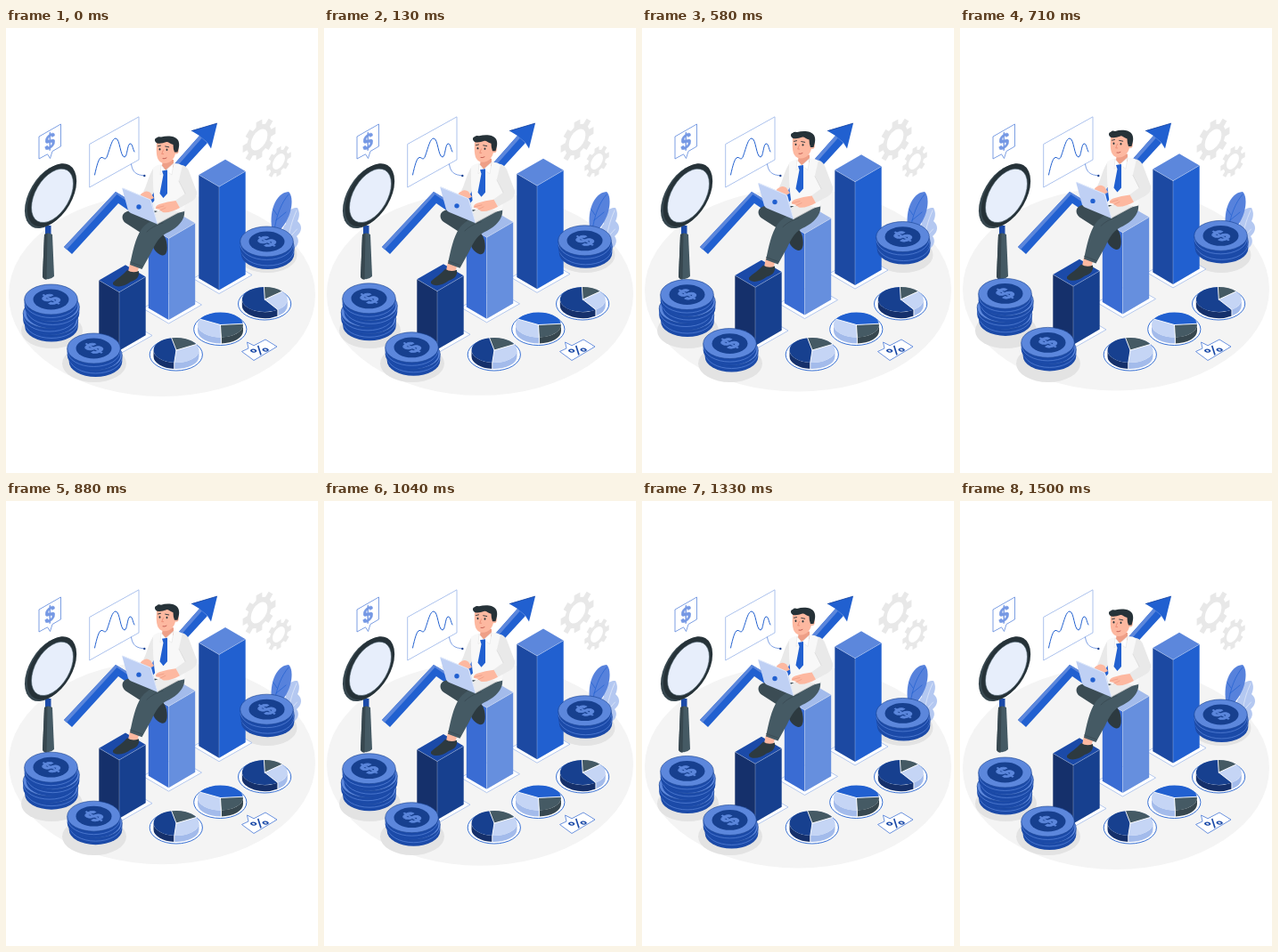
Write an HTML page that moves like this. It is 350x500 px and loops after 1540 ms.

```html
<!DOCTYPE html>
<html lang="en">
<head>
<meta charset="utf-8">
<title>Growth</title>
<style>
html, body { margin: 0; width: 100%; height: 100%; overflow: hidden; background: #fff; }
svg { display: block; width: 350px; height: 500px; }
text { font-family: Inter, Arial, sans-serif; font-weight: 700; text-anchor: middle; }
</style>
</head>
<body>
<svg id="stage" viewBox="0 0 350 500"></svg>
<script>
const blue = '#2160d0', mid = '#5c87dc', pale = '#a3bbeb', ice = '#c5d5f5',
  navy = '#17408f', deep = '#15306b', royal = '#1b4aa8',
  slate = '#455a64', dusk = '#37474f', ink = '#263238', skin = '#fdb8a0';

const path = (d, fill, extra = '') => `<path d="${d}" fill="${fill}" ${extra}/>`;
const line = (d, color, w = 1) =>
  path(d, 'none', `stroke="${color}" stroke-width="${w}" stroke-linecap="round" stroke-linejoin="round"`);
const poly = (pts, fill, extra = '') => `<polygon points="${pts}" fill="${fill}" ${extra}/>`;
const oval = (x, y, rx, ry, fill, extra = '') =>
  `<ellipse cx="${x}" cy="${y}" rx="${rx}" ry="${ry}" fill="${fill}" ${extra}/>`;
const floating = s => `<g class="float">${s}</g>`;

// Isometric planes: lying on the floor, and standing upright
const flat = (x, y, s) => `<g transform="matrix(.87 -.5 .87 .5 ${x} ${y})">${s}</g>`;
const wall = (x, y, s) => `<g transform="matrix(.87 -.5 0 1 ${x} ${y})">${s}</g>`;
const glyph = (ch, size, fill, bold = 0) =>
  `<text y="${size * .36}" font-size="${size}" fill="${fill}" stroke="${fill}" stroke-width="${bold}">${ch}</text>`;

function gear(x, y, r) {
  let d = '';
  for (let i = 0; i < 8; i++) {
    [[-.25, .74], [-.18, 1], [.18, 1], [.25, .74]].forEach(([off, k]) => {
      const a = i * Math.PI / 4 + off;
      d += `${d ? 'L' : 'M'}${(r * k * Math.cos(a)).toFixed(2)} ${(r * k * Math.sin(a)).toFixed(2)}`;
    });
  }
  const h = r * .5;
  d += `Z M${h} 0 A${h} ${h} 0 1 0 ${-h} 0 A${h} ${h} 0 1 0 ${h} 0Z`;
  return wall(x, y, path(d, '#e8e8e8', 'fill-rule="evenodd"'));
}

function bar(x, top, front, left, right, lid) {
  const xl = x - 22.7, xr = x + 29.7, yl = top - 13.3, yr = top - 17.3, drop = front - top;
  return poly([x - 29, front - 13, x, front + 4, x + 37, front - 17, x + 8, front - 34], '#fff',
      `stroke="${pale}" stroke-width=".8"`) +
    poly([xl, yl, x, top, x, front, xl, yl + drop], left) +
    poly([x, top, xr, yr, xr, yr + drop, x, front], right) +
    poly([xl, yl, x + 7, top - 30.5, xr, yr, x, top], lid) +
    line(`M${xl} ${yl} L${x} ${top} L${xr} ${yr} M${x} ${top} V${front}`, '#ffffff80', .5);
}

function coin(x, y, marked) {
  const rx = 29.8, ry = 17, h = 7.5;
  const side = path(`M${x - rx} ${y} v${h} a${rx} ${ry} 0 0 0 ${2 * rx} 0 v${-h}z`, royal) +
    line(`M${x - rx + .4} ${y + 3.5} a${rx - .4} ${ry} 0 0 0 ${2 * rx - .8} 0`, mid, .7);
  const face = oval(x, y, rx, ry, mid, `stroke="${navy}" stroke-width=".6"`);
  const mark = oval(x, y, 20, 11.4, navy) + flat(x, y, glyph('$', 22, mid, .8));
  return side + face + (marked ? mark : '');
}
const stack = coins => coins.map(([x, y], i) => coin(x, y, i === coins.length - 1)).join('');

// Slices: start and end angle in degrees (clockwise from right), face, rim
function pie(x, y, slices) {
  const rx = 25.5, ry = 14, h = 7;
  const at = a => [x + rx * Math.cos(a * Math.PI / 180), y + ry * Math.sin(a * Math.PI / 180)];
  let s = oval(x - .2, y + 5, 29.6, 18, '#fff', `stroke="${blue}" stroke-width=".9"`);
  slices.forEach(([a, b, , rim]) => {
    const lo = Math.max(a, 0), hi = Math.min(b, 180);
    if (lo >= hi) return;
    const p = at(lo), q = at(hi);
    s += path(`M${p} v${h} A${rx} ${ry} 0 0 1 ${q[0]} ${q[1] + h} v${-h} A${rx} ${ry} 0 0 0 ${p}Z`, rim);
  });
  slices.forEach(([a, b, face]) => {
    s += path(`M${x} ${y} L${at(a)} A${rx} ${ry} 0 ${b - a > 180 ? 1 : 0} 1 ${at(b)}Z`, face);
  });
  slices.forEach(([a]) => {
    s += line(`M${x} ${y} L${at(a)}${a > 0 && a < 180 ? `v${h}` : ''}`, '#fff', .9);
  });
  return s;
}

const floor = oval(175, 300, 172, 114, '#f4f4f4');
const shadows = oval(51.5, 340, 34.5, 20, '#e3e3e3') + oval(99, 377, 36, 21, '#e3e3e3') +
  oval(293, 255, 33.5, 20, '#e3e3e3');

const bubble = path('M37 122 L61.5 108 V133 L52 138.5 L49.5 146.5 L46.5 141.8 L37 147Z', '#fff',
    `stroke="${mid}" stroke-width=".8"`) + wall(49.2, 127.5, glyph('$', 22, '#7598e4', .4));

const chart = poly('93.7,130.5 149,99.8 149,148 93.7,179', '#fff', `stroke="${pale}" stroke-width=".9"`) +
  line('M99.5 165 C102 154 104 146 107 145.500 S111 150 113.500 144 C117 134 119 124 123 124 C128 124 128 145 133 145 C136 145 136 131 139 130 C142 129.500 142 136 144 139', blue, 1) +
  line('M140.500 153 C142 163 147 165 154 165.700', mid, .8) + oval(155.3, 166, 1.2, 1.2, navy);

const arrow = poly('65,246 123,184 148,199 217,121 226,129 149,213 126,197 74,254', blue) +
  poly('65,246 123,184 124.5,187 68,249', mid) + poly('123,184 148,199 148,203 124.5,187', mid) +
  poly('148,199 217,121 220,123.500 150,203', mid) +
  poly('208,115.500 237,107 230,135.500 226,129 217,121', blue) +
  line('M208.500 115.500 L236.500 107.200', royal, .9);

const lens = path('M44 222 h6.500 v12 h-6.500z', royal) +
  path('M43 232 q4.500-3 9 0 L54 279 q-6 6-13 1z', slate) +
  path('M43 232 l3.500-1.500 L45.500 283 q-3.500-.5-4.500-3z', dusk) +
  wall(48.8, 189.3, oval(0, 0, 32, 32, dusk)) + wall(51.5, 187.8, oval(0, 0, 31.8, 31.8, ink)) +
  wall(52, 188.4, oval(0, 0, 27, 27, '#e7eefb', `stroke="${slate}" stroke-width=".6"`));

const plant =
  path('M313 248 C309 234 308 226 314 220 C311 212 318 201 327 202 C330 208 329 213 327 217 C333 222 332 229 326 234 C331 241 325 248 319 250Z', '#b4c8f1') +
  line('M316 246 C317 229 321 216 326 205 M317 233 l-5-6 M317.500 236 l9-10', '#e6edfb', .7) +
  path('M299 229 C294 208 302 185 317 184 C324 190 321 216 304 230Z', '#5782dc') +
  line('M301 228 C303 211 309 196 317 187 M304 210 l-4-6 M303 216 l11-9', blue, .7);

const bars = bar(239, 178.3, 294.5, '#1c49a2', blue, mid) +
  bar(182.5, 236.5, 328, '#3a6cd3', '#668fde', pale) +
  bar(127, 296.8, 362.5, deep, navy, royal);

const shoe = '#2d3a40';
const legs =
  path('M167 234 C171 228 177 229 180 240 C182 250 180 256 175 255.500 C168 253 163 247 165 239Z', shoe) +
  path('M188 205 L145 206 C131 203 127 213 134 219 L165 239 L176 228Z', '#3b4c54') +
  path('M139 264 L149 269 L147 276 L137 274Z', skin) +
  path('M120 286 C125 281 131 278 136 272 Q142 276 149 273 C150 280 146 283 140 285 C133 291 123 292 120 288Z', shoe) +
  path('M200 204 C202 217 190 226 179 231 C170 236 167 244 163 252 L152.500 271 L139 266 C142 252 145 236 152 226 C159 216 175 212 182 205Z', slate) +
  line('M139.500 263 L153 268 M158 229 Q165 222 176 219', dusk, .7);

const torso =
  path('M165 158 C159 168 158 177 154 184 L162 191 L171 176Z', '#e9e9e9') +
  path('M165 157 Q170 153 176 153 L188 152 Q200 152 203 161 L200 206 Q182 212 168 205 Q164 180 165 157Z', '#f8f8f8') +
  path('M176 148 L188 148 L188 156 L180 161 L175 155Z', '#ee9f87') +
  path('M174 154 L179 160 L173 165Z M188 152 L179 160 L186 165Z', '#fff', 'stroke="#dedede" stroke-width=".5"') +
  path('M175 160.500 L181 159.500 L181 164 L181 186 L176.500 191 L172.500 186 L176.500 165Z', blue) +
  path('M151 187 Q157 181 162 185 L166 191 L158 195 L151 191Z', skin);

const laptop = poly('163,209 179,202 194,207 170,220', '#ececec') +
  line('M170 220 L194 207', '#c9c9c9', .8) +
  path('M132 180 Q130 179 130.500 181 L137 205 Q138 207 140 208 L170 220.500 L163.500 194.500 Q163 193 161 192.200Z', '#bfd0f4') +
  line('M131 180 L162 193 L170 220', '#e6eefc', .8) +
  oval(149, 201, 2.7, 2.7, blue);

const arm =
  path('M198 154 Q204 156 206 163 L214 184 Q215 191 208 195 L195 202 L190 194 L201 186 L194 171Z', '#e9e9e9') +
  line('M194 172 L201 186', '#d5d5d5', .7) +
  path('M190.500 194 L195 202 C188 206 181 208 176 207 L172 204 L168 203 Q167 200 172 198 Q181 195 190.500 194Z', skin) +
  line('M169 202 L177 200 M173 205 L179 202', '#e7937b', .6);

const head =
  path('M169 129 C168.500 139 168 149 175 151.500 C183 154 189 147 190 141 L191 129 L174 125Z', skin) +
  oval(191, 137.500, 2.8, 4, skin) +
  path('M169.500 129.500 C166.500 128 166 124 169 123.500 Q170.500 121.500 174 122.500 C181 120.500 190 121 193 126 C195.500 131 193.500 136 192.500 139.500 L189 139.500 Q187.500 136 187.500 131 C184 130 182 127.500 180 128 Q174 130.500 169.500 129.500Z', ink) +
  oval(172.500, 136.300, .9, 1.2, ink) + oval(180.500, 136.800, .9, 1.2, ink) +
  line('M170.500 132.800 l3-.7 M178.700 133 l4 .8', ink, .9) +
  line('M176.500 137 l-1.800 4.500 h2', '#e7826b', .7) + line('M176 146.700 q2.200.6 4-.7', '#b64b43', .8);

const coins = stack([[51, 328], [49, 320.500], [52.500, 313], [50.500, 305]]) +
  stack([[100.500, 367.500], [98.500, 360]]) + stack([[293.500, 246.500], [292.500, 240]]);

const pies = pie(191, 362, [[-102, -28, slate, dusk], [-28, 95, ice, pale], [95, 258, navy, deep]]) +
  pie(240.500, 333.500, [[-5, 88, slate, dusk], [88, 207, ice, pale], [207, 355, blue, navy]]) +
  pie(290.3, 305, [[-92, -40, slate, dusk], [-40, 55, ice, pale], [55, 268, navy, deep]]);

const percent = path('M264.500 363.500 L272 360 L270.500 353 L278 356.800 L291 350 L304 358 L278 373.500Z', '#fff',
    `stroke="${mid}" stroke-width=".9" stroke-linejoin="round"`) + flat(284.5, 362, glyph('%', 17, royal));

document.getElementById('stage').innerHTML =
  floating(floor) + shadows + gear(284, 125.5, 21.5) + gear(306, 150, 16) +
  bubble + chart + arrow + lens + plant +
  floating(bars + legs + torso + laptop + arm + head + coins) + pies + percent;

// Linear rise and fall of 7px in 36 steps at 24 fps, then one step of rest
const LOOP = 1540, STEP = 1000 / 24, HALF = 18, RISE = 7;
const floats = document.querySelectorAll('.float');
const start = performance.now();

function draw(now) {
  const t = Math.max(0, now - start) % LOOP;
  const n = Math.min(2 * HALF, Math.floor((t + 5) / STEP));
  const y = -RISE * (1 - Math.abs(n - HALF) / HALF);
  floats.forEach(g => g.setAttribute('transform', `translate(0 ${y.toFixed(3)})`));
  requestAnimationFrame(draw);
}
draw(start);
</script>
</body>
</html>
```
